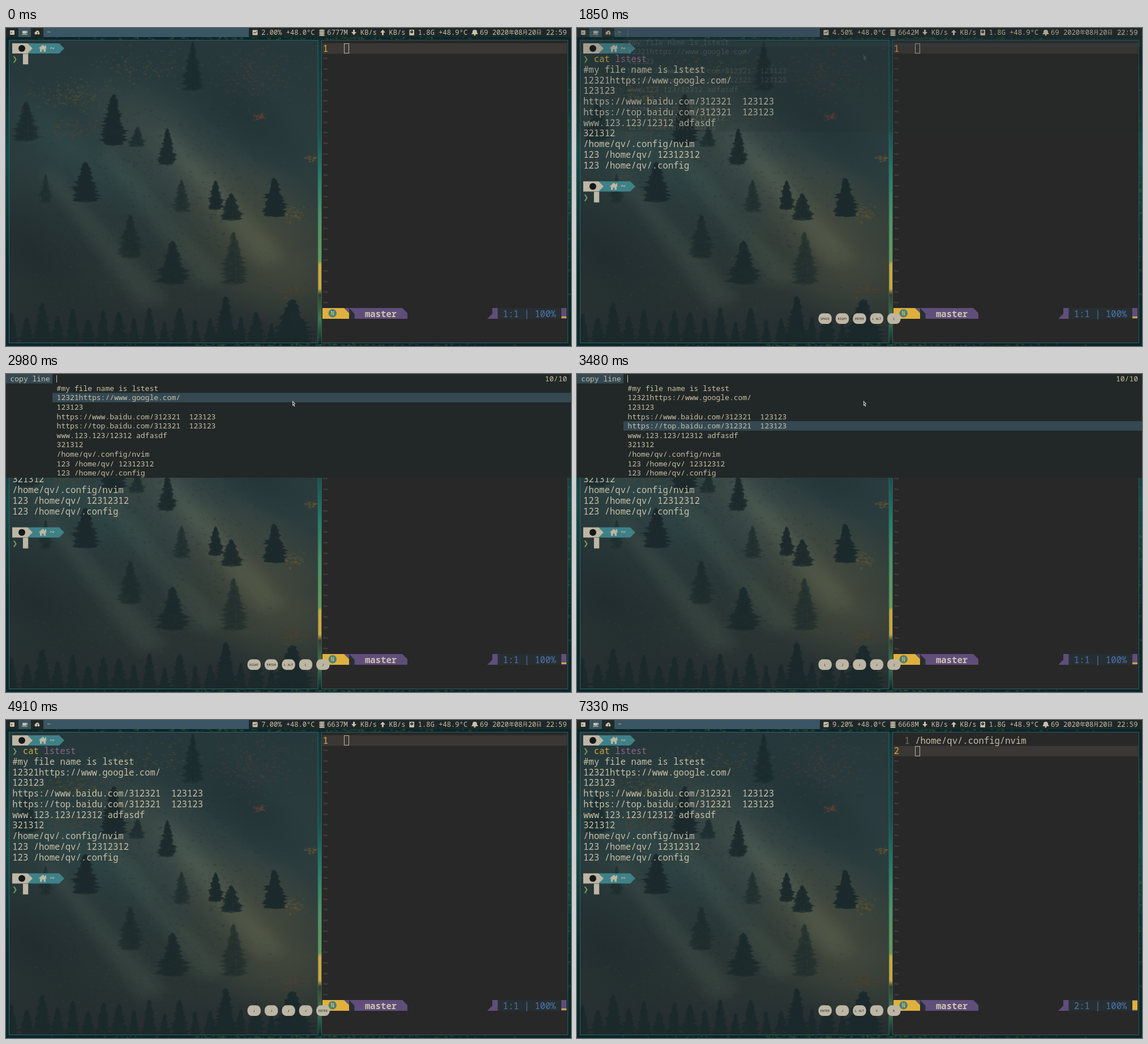
Recreate the animation shown at these times as an HTML page with a canvas. Size 998 px wide and 561 px high, loop 8000 ms.

```html
<!DOCTYPE html>
<html lang="en">
<head>
<meta charset="utf-8">
<title>Terminal line picker</title>
<style>
html, body { margin: 0; width: 100%; height: 100%; overflow: hidden; background: #08272a; }
canvas { display: block; }
</style>
</head>
<body>
<canvas id="stage" width="998" height="561"></canvas>
<script>
const W = 998, H = 561, LOOP = 8000;
const MONO = '"Noto Sans Mono", "DejaVu Sans Mono", monospace';
const CJK = '"Noto Sans CJK JP", "Noto Sans CJK SC", "Noto Sans CJK", sans-serif';
const CELL = 9.36, ROW = 18.73, MENU_ROW = 16.64;
const FG = '#c9c0a8', YELLOW = '#e0b03c', PURPLE = '#5f4e7a', TEAL = '#3f8188', CREAM = '#bdb6a4', DARK = '#282828';

const LINES = [
  '#my file name is lstest', '12321https://www.google.com/', '123123',
  'https://www.baidu.com/312321  123123', 'https://top.baidu.com/312321  123123',
  'www.123.123/12312 adfasdf', '321312', '/home/qv/.config/nvim',
  '123 /home/qv/ 12312312', '123 /home/qv/.config'
];
const KEYS = [
  [210, 'C'], [330, 'A'], [450, 'T'], [560, 'SPACE'], [1010, 'RIGHT'], [1190, 'ENTER'],
  [1800, 'L ALT'], [1800, 'L'], [2920, 'J'], [3090, 'J'], [3250, 'J'], [3420, 'J'], [3600, 'J'],
  [4070, 'J'], [4320, 'J'], [4680, 'ENTER'], [5220, 'J'], [5750, 'L ALT'], [5750, 'V'], [6780, 'K']
];
const MOVES = [2980, 3140, 3310, 3480, 3660, 4070, 4320];
const STATS = [
  [0, '2.00%', '6777M'], [1250, '4.50%', '6642M'], [4880, '7.00%', '6637M'],
  [6100, '11.30%', '6665M'], [7330, '9.20%', '6668M']
];

const stage = document.getElementById('stage').getContext('2d');
let ctx = stage;

let seed = 7;
const random = () => (seed = (seed * 16807) % 2147483647) / 2147483647;
const spread = r => (random() + random() + random() - 1.5) / 1.5 * r;

function rect(color, x, y, w, h) {
  ctx.fillStyle = color;
  ctx.fillRect(x, y, w, h);
}
function frame(color, x, y, w, h) {
  ctx.strokeStyle = color;
  ctx.lineWidth = 1;
  ctx.strokeRect(x + .5, y + .5, w - 1, h - 1);
}
function poly(color, ...p) {
  ctx.fillStyle = color;
  ctx.beginPath();
  for (let i = 0; i < p.length; i += 2) ctx.lineTo(p[i], p[i + 1]);
  ctx.fill();
}
function disc(color, x, y, rx, ry = rx) {
  ctx.fillStyle = color;
  ctx.beginPath();
  ctx.ellipse(x, y, rx, ry, 0, 0, 7);
  ctx.fill();
}
function pill(color, x, y, w, h, r) {
  ctx.fillStyle = color;
  ctx.beginPath();
  ctx.roundRect(x, y, w, h, r);
  ctx.fill();
}
// y is the middle of the capital letters
function text(s, x, y, size, color = FG, { weight = '', family = MONO, align = 'left' } = {}) {
  ctx.font = `${weight} ${size}px ${family}`;
  ctx.textAlign = align;
  ctx.fillStyle = color;
  ctx.fillText(s, x, y + size * .357);
}
const term = (s, x, row, color, opts) => text(s, x, 36 + row * ROW, 15.6, color, opts);

/* ---------- wallpaper ---------- */
function glow(color, x, y, rx, ry, alpha) {
  ctx.save();
  ctx.translate(x, y);
  ctx.rotate(.7);
  ctx.scale(rx, ry);
  const g = ctx.createRadialGradient(0, 0, 0, 0, 0, 1);
  g.addColorStop(0, color);
  g.addColorStop(1, color + '00');
  ctx.globalAlpha = alpha;
  rect(g, -1, -1, 2, 2);
  ctx.restore();
}
function dabs(color, x, y, rx, ry, count, alpha) {
  ctx.globalAlpha = alpha;
  for (let i = 0; i < count; i++) {
    disc(color, x + spread(rx), y + spread(ry), .6 + random() * 2.6, .5 + random() * 1.4);
  }
  ctx.globalAlpha = 1;
}
function tree(x, top, h, w, alpha) {
  ctx.globalAlpha = alpha;
  const color = '#1c2a2c';
  rect(color, x - 1, top, 2, h);
  for (let y = 3; y < h; y += 3.2) {
    const reach = w / 2 * Math.min(1, .15 + y / h * 1.1);
    for (const side of [-1, 1]) {
      const tip = x + side * reach * (.45 + random() * .6), base = top + y;
      poly(color, x, base - 5, tip, base + spread(4), x, base + 4);
      disc(color, (x + tip) / 2, base, reach * .28, 2.6);
    }
  }
  ctx.globalAlpha = 1;
}
function forest() {
  ctx.save();
  ctx.beginPath();
  ctx.rect(5, 21, 546, 535);
  ctx.clip();
  const g = ctx.createLinearGradient(0, 21, 0, 556);
  g.addColorStop(0, '#26383b');
  g.addColorStop(.45, '#2c3d3e');
  g.addColorStop(.8, '#2c3735');
  g.addColorStop(1, '#262e30');
  rect(g, 5, 21, 546, 535);
  glow('#4b5850', 320, 245, 270, 95, .7);
  glow('#51523f', 455, 375, 200, 130, .8);
  glow('#34514f', 120, 215, 190, 60, .5);
  glow('#1f2a2d', 50, 400, 260, 130, .8);
  glow('#1f3034', 420, 150, 170, 60, .6);

  ctx.filter = 'blur(9px)';
  ctx.globalAlpha = .09;
  for (let i = 0; i < 6; i++) {
    const x = 60 + i * 52, y = 255 - i * 18;
    poly(i % 2 ? '#17282c' : '#93a08a', x, y, x + 18, y - 8, x + 230, y + 225, x + 175, y + 240);
  }
  ctx.globalAlpha = 1;
  ctx.filter = 'none';

  dabs('#1e2c2e', 280, 300, 300, 300, 700, .17);
  dabs('#4c5a42', 260, 430, 290, 120, 350, .13);
  dabs('#6b5a2d', 110, 120, 100, 42, 260, .22);
  dabs('#74482f', 115, 180, 70, 28, 130, .2);
  dabs('#754333', 440, 80, 110, 75, 330, .2);
  dabs('#715d2c', 245, 70, 120, 50, 180, .2);
  dabs('#7b4430', 447, 157, 18, 9, 40, .35);
  dabs('#7c6430', 510, 328, 24, 22, 70, .25);
  dabs('#7c5f30', 540, 230, 14, 9, 35, .35);
  dabs('#70452f', 515, 462, 45, 22, 100, .18);

  [[35, 130, 70, 60, .4], [330, 25, 85, 46, .4], [190, 118, 88, 62, .75], [232, 175, 35, 40, .4],
   [285, 178, 62, 42, .6], [140, 237, 68, 66, .7], [70, 258, 50, 30, .25], [310, 268, 55, 42, .3],
   [370, 270, 50, 38, .7], [398, 292, 45, 52, .6], [474, 266, 66, 62, .9], [402, 360, 90, 60, .28],
   [220, 330, 75, 60, .35], [294, 376, 76, 74, .55], [388, 474, 90, 58, .75], [505, 480, 85, 96, .9]
  ].forEach(t => tree(...t));
  for (let x = 10; x < 550; x += 27) {
    tree(x, 485 + 22 * Math.sin(x * .05) ** 2 + random() * 18, 85, 42 + random() * 16, .55);
  }
  ctx.restore();
}
function wallpaper() {
  rect('#08272a', 0, 0, W, H);
  const side = ctx.createLinearGradient(0, 0, 0, H);
  side.addColorStop(.1, '#08272a');
  side.addColorStop(.4, '#0c4c4a');
  side.addColorStop(.75, '#07292c');
  rect(side, 0, 0, 5, H);
  rect(side, 993, 0, 5, H);
  const gap = ctx.createLinearGradient(0, 21, 0, 556);
  [[0, '#103638'], [.3, '#14524f'], [.45, '#238068'], [.58, '#4c9465'], [.73, '#679b58'],
   [.74, '#cda83c'], [.82, '#cda83c'], [.84, '#31402f'], [.92, '#3f7a4d'], [1, '#0b2a2a']
  ].forEach(([p, c]) => gap.addColorStop(p, c));
  rect(gap, 551, 21, 6, 535);
  dabs('#3a5a36', 500, 18, 500, 3, 150, .4);
  dabs('#3a5a36', 500, 559, 500, 3, 150, .4);
  dabs('#3a5a36', 995, 300, 3, 270, 60, .4);
  forest();
  frame('#3f5f63', 5, 21, 546.5, 535);
  rect(DARK, 557, 21, 436, 535);
  frame('#3f5557', 557, 21, 436, 535);
}

/* ---------- top bar ---------- */
function bar(t, title) {
  const [, cpu, memory] = STATS.findLast(s => t >= s[0]);
  const w = 7.29, left = 494.7 - (cpu.length + 1) * w;
  const put = (s, x, size = 12.15, opts) => text(s, x, 8, size, FG, opts);
  rect('#1f2829', 0, 0, W, 16);
  rect('#39545f', 22, 0, 22, 16);
  rect('#3a5563', 66, 0, left - 88, 16);

  pill(FG, 7, 4, 8, 8, 1);
  text('>', 8, 7.5, 6, '#1f2829', { weight: 'bold' });
  pill(FG, 29, 5, 7, 5, 1);
  frame(FG, 34, 5, 4, 4);
  rect(FG, 28, 11, 10, 1);
  disc(FG, 53, 9, 2.5);
  disc(FG, 55.5, 7.5, 3);
  disc(FG, 57.5, 9.5, 2);
  rect('#1f2829', 55, 7, 1, 3);
  put(title, 72);

  pill(FG, left - 15.5, 3.5, 9, 9, 1);
  ctx.strokeStyle = '#1f2829';
  ctx.beginPath();
  ctx.moveTo(left - 14, 9);
  ctx.lineTo(left - 11.5, 7.5);
  ctx.lineTo(left - 10.5, 9);
  ctx.lineTo(left - 8, 5.5);
  ctx.stroke();
  put(cpu + ' +48.0°C', left);
  for (let i = 0; i < 4; i++) disc(FG, 558, 4 + i * 2.9, 5, 1.2);
  put(memory, 567.3);
  poly(FG, 613, 3, 616, 3, 616, 7, 619, 7, 614.5, 12.5, 610, 7, 613, 7);
  put('KB/s', 626);
  poly(FG, 664, 12.5, 667, 12.5, 667, 8, 670, 8, 665.5, 3, 661, 8, 664, 8);
  put('KB/s', 676.5);
  pill(FG, 712.5, 3, 8.5, 10, 1);
  disc('#1f2829', 716.7, 6.8, 2.5);
  disc(FG, 716.7, 6.8, .8);
  put('1.8G +48.9°C', 727.8);
  pill(FG, 824, 3, 8, 8, [4, 4, 0, 0]);
  poly(FG, 824, 8, 832, 8, 834, 11, 822, 11);
  disc(FG, 828, 12, 1.6);
  put('69', 837);
  let x = 859;
  for (const part of ['2020', '年', '08', '月', '20', '日']) {
    const wide = part > '年' || part === '年' || part === '日' || part === '月';
    put(part, x, wide ? 9.6 : 12.15, wide ? { family: CJK } : {});
    x += wide ? 9.6 : part.length * w;
  }
  put('22:59', 954);
}

/* ---------- windows ---------- */
function cursor(x, row, focused) {
  const y = 27 + row * ROW;
  if (focused) rect(CREAM, x, y - .3, CELL, ROW);
  else frame(CREAM, Math.round(x), Math.round(y), 9, 18);
}
function prompt(row) {
  const y = 27 + row * ROW, mid = y + 9;
  poly(TEAL, 38, y, 94, y, 103, mid, 94, y + 18, 38, y + 18);
  poly(CREAM, 11, y, 38, y, 47, mid, 38, y + 18, 11, y + 18);
  disc('#14181a', 28, mid, 6);
  poly(CREAM, 57.5, mid, 65, mid - 6.5, 72.5, mid, 70, mid, 70, mid + 6, 66.5, mid + 6, 66.5, mid + 2,
    63.5, mid + 2, 63.5, mid + 6, 60, mid + 6, 60, mid);
  rect(CREAM, 69, mid - 5.5, 2, 4);
  term('~', 77, row, CREAM, { weight: 'bold' });
  term('❯', 11, row + 1, '#6a9e58', { weight: 'bold' });
}
function shell(t, focused) {
  const done = t >= 1250;
  const typed = t >= 1010 ? 10 : KEYS.filter(k => t >= k[0]).length;
  prompt(0);
  term('cat'.slice(0, typed), 29.9, 1, '#cba93f');
  if (typed) {
    const cut = Math.max(4, typed);
    if (typed < 10) term('cat lstest'.slice(typed), 29.9 + typed * CELL, 1, '#66695f');
    else term('cat lstest'.slice(4, cut), 29.9 + 4 * CELL, 1, '#8f6689');
  }
  if (done) {
    LINES.forEach((line, i) => term(line, 11.2, i + 2));
    prompt(13);
  }
  cursor(29.9 + (done ? 0 : typed * CELL), done ? 14 : 1, focused);
  if (typed && typed < 10) term('cat lstest'[typed], 29.9 + typed * CELL, 1, '#3a3a36');
}
function editor(pasted, focused) {
  const x = 559.7, line = pasted ? 1 : 0;
  rect('#3b3735', 559, 27 + line * ROW, 432, 18.5);
  if (pasted) {
    term('1', x + 2 * CELL, 0, '#7c6f64');
    term(LINES[7], x + 4 * CELL, 0);
  }
  term(String(line + 1), x, line, YELLOW);
  for (let row = line + 1; row < 25; row++) term('~', x, row, '#55504b');
  cursor(x + 4 * CELL, line, focused);

  const y = 494, mid = 504, end = 513;
  poly(PURPLE, 597, y, 700, y, 709, mid - 1, 709, end, 597, end);
  poly('#282f33', 606, y, 615.5, mid, 615.5, end, 606, end);
  poly(YELLOW, 559, y, 597, y, 606, mid - 1, 606, end, 559, end);
  disc(TEAL, 576.8, 503.2, 7.2);
  text('N', 576.8, 503.2, 10, YELLOW, { weight: 'bold', align: 'center' });
  term('master', 634, 25, '#cfc3ae', { weight: 'bold' });
  rect('#282f33', 868, y, 113, 19);
  poly(PURPLE, 850, end, 859, mid, 859, y, 868.5, y, 868.5, end);
  term(`${line + 1}:1 | 100%`, 877.8, 25, '#4c76ab');
  rect(PURPLE, 981, y, 9, 19);
  if (pasted) rect(YELLOW, 981, 495, 9, 16.5);
  else rect(YELLOW, 981, 509, 9, 2.5);
}
function menu(t) {
  const alpha = t < 3000 ? (t - 1800) / 290 : (4910 - t) / 230;
  if (alpha <= 0) return;
  const selected = MOVES.filter(m => t >= m).length;
  ctx.save();
  ctx.globalAlpha = Math.min(1, alpha);
  rect('#222827', 0, 0, W, 183);
  rect('#354953', 0, 0, 82, 16.6);
  rect('#354953', 82, (selected + 1) * MENU_ROW, 916, MENU_ROW);
  text('copy line', 7.5, 8.5, 13);
  rect(FG, 89, 2, 1, 13);
  text('10/10', 952, 8.5, 13);
  LINES.forEach((line, i) => text(line, 89.6, 25 + i * MENU_ROW, 13));
  poly('#d8d8d0', 506, 47, 511.5, 53, 508.8, 53.5, 510.5, 57, 509, 57.6, 507.8, 54.5, 506, 56.5);
  poly('#222827', 507, 49.5, 509.5, 52.4, 507, 54);
  ctx.restore();
}
function keycaps(t) {
  const recent = KEYS.filter(k => t >= k[0]).slice(-5);
  recent.forEach(([, label], i) => {
    const x = 499 + (i - (recent.length - 1) / 2) * 30.4;
    pill(CREAM, x - 11.7, 503.3, 23.4, 18.8, 8);
    text(label, x, 512.8, 5.4, '#20201e', { align: 'center' });
  });
}

const backdrop = document.createElement('canvas');
backdrop.width = W;
backdrop.height = H;
ctx = backdrop.getContext('2d');
wallpaper();
ctx = stage;

function draw(now) {
  const t = now % LOOP;
  const editing = t >= 5220 && t < 6780;
  ctx.drawImage(backdrop, 0, 0);
  bar(t, editing ? 'nvim' : '~');
  shell(t, !editing);
  editor(t >= 5830, editing);
  menu(t);
  keycaps(t);
  requestAnimationFrame(draw);
}
requestAnimationFrame(draw);
</script>
</body>
</html>
```
